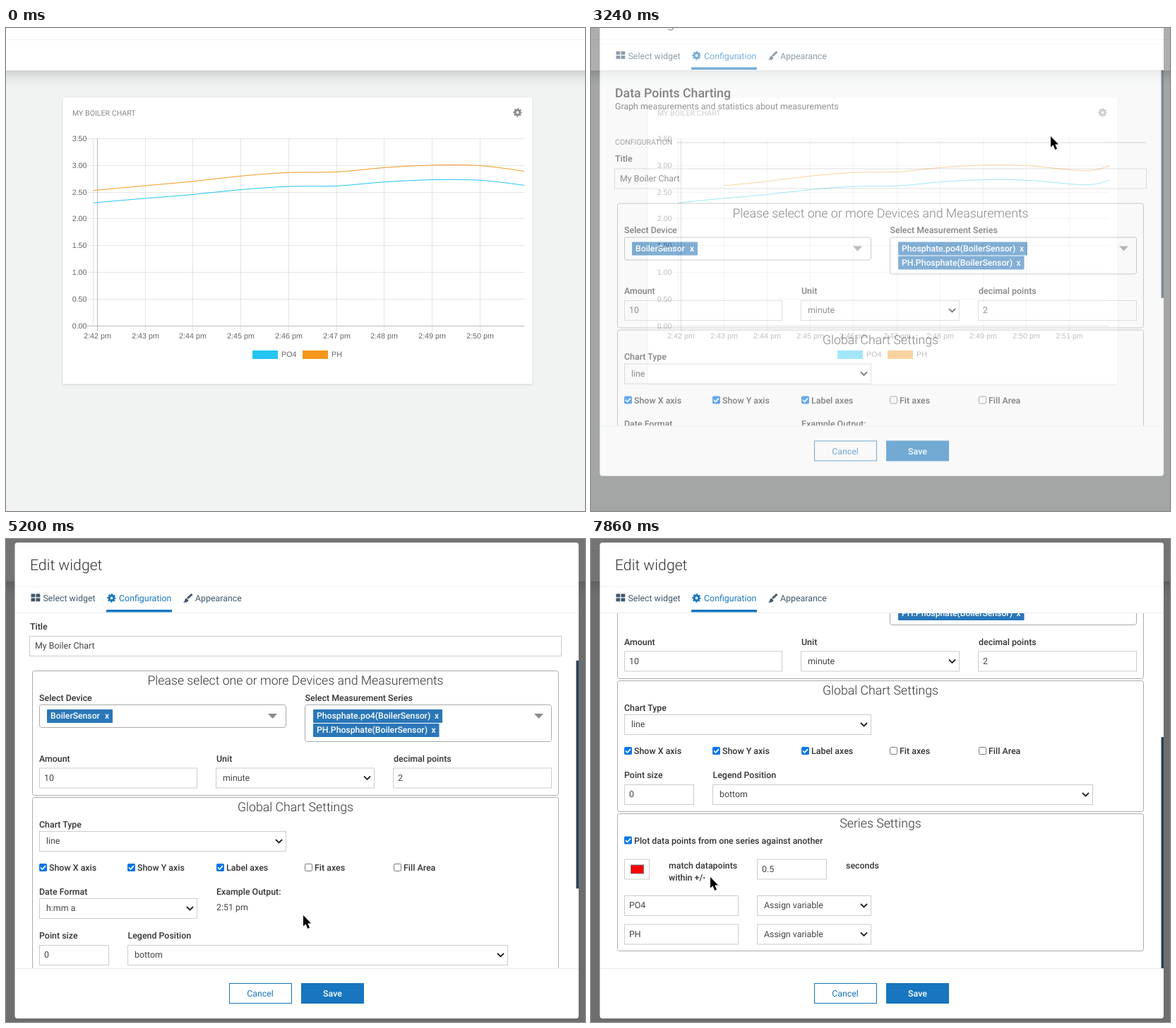
An HTML page that plays this animation: 820x683 px, repeating every 7990 ms.

```html
<!DOCTYPE html>
<html lang="en">
<head>
<meta charset="utf-8">
<title>Edit widget</title>
<style>
  html, body { margin: 0; width: 100%; height: 100%; overflow: hidden; background: #f1f3f3; }
  svg { display: block; width: 820px; height: 683px; }
  text { font-family: Roboto, sans-serif; text-rendering: geometricPrecision; white-space: pre; }
  .chart text { font-family: "Liberation Sans", Arial, sans-serif; }
  #menu > path:first-child { filter: drop-shadow(0 3px 7px rgba(0,0,0,.3)); }
  #card { filter: drop-shadow(0 1px 1px rgba(0,0,0,.16)); }
</style>
</head>
<body>
<svg id="stage" viewBox="0 0 820 683" xmlns="http://www.w3.org/2000/svg"></svg>
<script>
const BLUE = '#1776bf', SLATE = '#41586d', NAVY = '#1f4763', CYAN = '#22c5f3', ORANGE = '#f3981b';
const LOOP = 7990, TICKS = 65;
const VIEW = 503, MAX_SCROLL = 282;

// y is the middle of the capital letters
function text(x, y, str, { size = 12.4, weight = 400, fill = '#444', anchor = 'start' } = {}) {
  return `<text x="${x}" y="${y + size * .355 - .4}" font-size="${size}" font-weight="${weight}" fill="${fill}" text-anchor="${anchor}">${str}</text>`;
}
const label = (x, y, str) => text(x, y, str, { weight: 500, fill: '#333' });
const heading = (y, str) => text(410, y, str, { size: 17.7, weight: 300, fill: '#333', anchor: 'middle' });
const rect = (x, y, w, h, fill, more = '') => `<rect x="${x}" y="${y}" width="${w}" height="${h}" fill="${fill}" ${more}/>`;
const frame = (x1, y1, x2, y2, color = '#ccc', r = 0) =>
  rect(x1 + .5, y1 + .5, x2 - x1, y2 - y1, '#fff', `stroke="${color}" rx="${r}"`);
const panel = (x1, y1, x2, y2) => frame(x1, y1, x2, y2, '#aaa', 3);
const stroke = (d, color, width = 1) => `<path d="${d}" fill="none" stroke="${color}" stroke-width="${width}"/>`;
const line = (x1, y1, x2, y2, color) => stroke(`M${x1} ${y1}L${x2} ${y2}`, color);

const input = (x1, x2, y, str, pad = 7) => frame(x1, y - 14, x2, y + 14) + text(x1 + pad, y, str);
const select = (x1, x2, y, str) => input(x1, x2, y, str, 10) + stroke(`M${x2 - 14} ${y - 2}l4.5 4.5 4.5-4.5`, '#222', 1.8);

function checkbox(x, y, str, on) {
  const box = on
    ? rect(x, y - 6, 11, 11, '#0a77e8', 'rx="1.8"') + stroke(`M${x + 2} ${y - .5}l2.5 2.6 4.5-5`, '#fff', 1.7)
    : rect(x + .5, y - 5.5, 10, 10, '#fff', 'stroke="#767676" rx="1.8"');
  return box + label(x + 14, y, str);
}

const gear = (x, y, color) => `<g fill="none" stroke="${color}">
  <circle cx="${x}" cy="${y}" r="3.4" stroke-width="3"/>
  <circle cx="${x}" cy="${y}" r="5.1" stroke-width="2.4" stroke-dasharray="2" stroke-dashoffset="1"/></g>`;
const pencil = (x, y, color) => stroke(`M${x + 1.5} ${y + 9.5}l7-7m.6-.6l1-1`, color, 3.6) +
  `<path d="M${x} ${y + 11}v-4l4 4z" fill="${color}"/>`;
const bin = (x, y, color) => stroke(`M${x} ${y + 2}h9.5M${x + 3} ${y + .5}h3.500`, color, 1.4) +
  stroke(`M${x + 1.5} ${y + 3}v7.300h6.500v-7.300M${x + 3.700} ${y + 4}v6m2.100 0v-6`, color, 1.3);
const brush = (x, y, color) => stroke(`M${x + 6} ${y + 7}l6.500-6`, color, 3) +
  `<path d="M${x + 4} ${y + 6.500}l3.500 3q-1 4-7.500 3 2.500-1 2.200-3.500z" fill="${color}"/>`;

const chip = (x, y, w, str) => rect(x, y - 9.5, w, 19, '#2a77b8', 'rx="1"') +
  text(x + 5, y, str, { size: 12.2, weight: 500, fill: '#fff' }) +
  text(x + w - 8, y, 'x', { size: 12.2, weight: 500, fill: '#fff', anchor: 'middle' });
const triangle = (x, y) => `<path d="M${x - 6.5} ${y - 3.5}h13l-6.5 7z" fill="#8a8a8a"/>`;
const swatch = (y, color) => frame(47, y - 14, 82, y + 14) + rect(56.5, y - 5.5, 18, 12, color, 'stroke="#777"');

function smooth(points) {
  const at = i => points[Math.max(0, Math.min(points.length - 1, i))];
  const control = (p, from, to, k) => [0, 1].map(j => p[j] + (to[j] - from[j]) * k);
  return `M${points[0]}` + points.slice(1).map((p, i) =>
    `C${control(at(i), at(i - 1), p, 1 / 6)} ${control(p, at(i), at(i + 2), -1 / 6)} ${p}`).join('');
}

// PH per minute; PO4 runs at a fixed ratio below it
const PH = [2.53, 2.62, 2.7, 2.8, 2.865, 2.876, 2.957, 3.003, 2.994];

function chart(id, x0, step, ticks, tail, firstPh) {
  const grey = { size: 10.7, fill: '#666' };
  const shade = dark => `rgba(0,0,0,${dark ? .27 : .1})`;
  let out = line(123.5, 156, 123.5, 421, shade(false));
  for (let i = 0; i < 8; i++) {
    const y = Math.round(156 + i * 37.8) + .5;
    out += line(115, y, 734, y, shade(i === 7)) + text(114.5, y, (3.5 - i / 2).toFixed(2), { ...grey, anchor: 'end' });
  }
  for (let i = 0; i < ticks; i++) {
    const x = Math.round(x0 + i * step - .5) + .5;
    out += line(x, 156, x, 429, shade(i === 0)) + text(x, 436, `2:${42 + i} pm`, { ...grey, anchor: 'middle' });
  }
  const samples = PH.map((v, i) => [i, v]).concat(tail);
  const series = (ratio, from, color) => stroke(smooth(samples.slice(from)
    .map(([m, v]) => [m ? x0 + m * step : 124, 421 - v * ratio * 75.6])), color);
  out += series(1 / 1.1, 0, CYAN) + series(1, firstPh, ORANGE);
  [['PO4', CYAN], ['PH', ORANGE]].forEach(([str, color], i) =>
    out += rect(349 + i * 71, 456, 36, 12, color) + text(390 + i * 71, 462, str, grey));
  return `<g id="${id}" class="chart">${out}</g>`;
}

function page() {
  return rect(0, 0, 820, 683, '#f1f3f3') + rect(0, 60, 820, 24, 'url(#shade)') +
    rect(0, 0, 820, 60, '#fff') + line(0, 16.5, 820, 16.5, '#f0f1f1') +
    rect(80.5, 98.5, 665, 405, '#fff', 'rx="1.5" id="card"') +
    text(94, 120.5, 'MY BOILER CHART', { size: 10.6, fill: '#888' }) +
    chart('before', 129.5, 67.7, 9, [[8.93, 2.89]], 0) +
    chart('after', 127.5, 61.1, 10, [[9.37, 2.9], [9.93, 2.99]], 1) +
    `<g id="gearGrey">${gear(724.5, 119.5, '#8c8c8c')}</g>` +
    `<g id="handle">${stroke('M727 485l8.500 8M726.500 488v-3.500h3.500M736 489.500v3.500h-3.500', '#aaa')}</g>` +
    '<g id="menu"><path d="M707 103H742V208H601V138H707Z" fill="#fff"/>' + line(601, 173.5, 742, 173.5, '#eee') +
    pencil(615, 150, BLUE) + text(629, 156, 'Edit', { fill: BLUE }) +
    bin(615, 185, NAVY) + text(629, 191, 'Remove', { fill: NAVY }) + '</g>' +
    `<g id="gearBlue">${gear(724.5, 119.5, BLUE)}</g>`;
}

// Form body; "matched" is the layout with one series plotted against another.
function form(id, matched) {
  const up = matched ? -62 : 0;
  let out = text(34, 136.5, 'Data Points Charting', { size: 17.7, weight: 500, fill: '#333' }) +
    text(34, 155, 'Graph measurements and statistics about measurements') +
    text(34, 206.5, 'CONFIGURATION', { size: 10.6, fill: '#666' }) + line(122, 206.5, 786, 206.5, '#b8b8b8') +
    label(34, 229.5, 'Title') + input(33, 786, 257, 'My Boiler Chart', 8) +
    panel(37, 292, 782, 468) + heading(306.5, 'Please select one or more Devices and Measurements') +
    label(47, 330.5, 'Select Device') + panel(47, 340, 396, 372) +
    chip(58, 356.5, 93, 'BoilerSensor') + triangle(377.5, 356.5) +
    label(423.5, 330.5, 'Select Measurement Series') + panel(423, 340, 772, 392) +
    chip(435, 356.5, 183, 'Phosphate.po4(BoilerSensor)') + chip(435, 376.5, 178.5, 'PH.Phosphate(BoilerSensor)') +
    triangle(754.5, 356.5) +
    label(47, 416.5, 'Amount') + input(47, 270, 443.5, '10') +
    label(298, 416.5, 'Unit') + select(297, 521, 443.5, 'minute') +
    label(549, 416.5, 'decimal points') + input(548, 772, 443.5, '2') +
    panel(37, 471, 782, 718 + up) + heading(485.5, 'Global Chart Settings') +
    label(47, 509.5, 'Chart Type') + select(47, 396, 533, 'line');
  ['Show X axis', 'Show Y axis', 'Label axes', 'Fit axes', 'Fill Area']
    .forEach((str, i) => out += checkbox(Math.floor(47 + i * 125.5), 571, str, i < 3));
  if (!matched) out += label(47, 604.5, 'Date Format') + select(47, 270, 628, 'h:mm a') +
    label(298, 604.5, 'Example Output:') + text(298, 626.5, '2:51 pm');
  out += `<g transform="translate(0 ${up})">` +
    label(47, 666.5, 'Point size') + input(47, 145, 694, '0') +
    label(172.5, 666.5, 'Legend Position') + select(172, 710, 694, 'bottom') +
    panel(37, 721, 782, matched ? 915 : 864) + heading(735.5, 'Series Settings') +
    checkbox(47, 759.5, 'Plot data points from one series against another', matched);
  if (matched) out += swatch(799.5, '#f00') + label(110, 794.5, 'match datapoints') + label(110, 811.5, 'within +/-') +
    input(235, 333, 799.5, '0.5') + label(361, 794.5, 'seconds');
  [['PO4', CYAN], ['PH', ORANGE]].forEach(([str, color], i) => {
    const y = (matched ? 851 : 799.5) + i * 40.5;
    out += matched
      ? input(47, 208, y, str) + select(235, 396, y, 'Assign variable')
      : swatch(y, color) + input(109, 270, y, str) + rect(298, y - 14, 42.5, 28, BLUE) +
        stroke(`M316 ${y - 4}l3.300 3 3.300-3m-6.600 4l3.300 3 3.300-3`, '#fff', 1.4);
  });
  return `<g id="${id}">${out}</g></g>`;
}

function modal() {
  let tiles = '';
  for (let i = 0; i < 4; i++) tiles += rect(35.5 + i % 2 * 7, 77.5 + (i >> 1) * 6, 5.8, 4.8, SLATE);
  return '<g id="overlay">' + rect(0, 0, 820, 683, '#000', 'opacity=".545"') + '<g id="modal">' +
    rect(12.5, 5, 798.5, 673, '#fff', 'rx="4"') +
    text(34, 36.5, 'Edit widget', { size: 21.2, weight: 300, fill: '#333' }) +
    line(13, 67.5, 811, 67.5, '#f0f1f2') + line(13, 104.5, 811, 104.5, '#eceef0') +
    tiles + text(52.5, 84, 'Select widget', { fill: SLATE }) +
    gear(149.5, 83.5, BLUE) + text(160, 84, 'Configuration', { fill: BLUE }) + rect(142, 100, 93, 3.5, BLUE) +
    brush(251, 77, SLATE) + text(268, 84, 'Appearance', { fill: SLATE }) +
    `<g clip-path="url(#view)"><g id="scroller">${form('plain', false)}${form('matched', true)}</g></g>` +
    rect(807.5, 104, 3.5, 323, '#2b4052', 'id="thumb"') +
    line(13, 607.5, 811, 607.5, '#eceef0') +
    rect(316.5, 628.5, 88, 28, '#fff', `stroke="${BLUE}"`) + text(360, 643, 'Cancel', { fill: BLUE, anchor: 'middle' }) +
    rect(418, 628, 89, 29, BLUE) + text(462.5, 643, 'Save', { weight: 500, fill: '#fff', anchor: 'middle' }) +
    '</g></g>';
}

const CURSORS = {
  arrow: 'M0 0V15.500L3.500 12.400 6.300 19 9 17.800 6.300 11.400H11Z',
  hand: 'M-1 1Q1-1 3 1V6L9 7.500Q11.500 8 11 12L9 16V20H0V17L-4 12Q-5 9-3 9.500L-1 11Z',
  beam: 'M-5.500-9H5.500V-6H2V6.500H5.500V9.500H-5.500V6.500H-2V-6H-5.500Z'
};

const stage = document.getElementById('stage');
stage.innerHTML = `<defs>
  <linearGradient id="shade" x2="0" y2="1"><stop stop-opacity=".14"/><stop offset=".5" stop-opacity=".04"/><stop offset="1" stop-opacity="0"/></linearGradient>
  <clipPath id="view"><rect x="13" y="105" width="798" height="502"/></clipPath></defs>` +
  page() + modal() + '<path id="cursor"/>';
const $ = id => document.getElementById(id);

// Stops on the pointer's way: tick, x, y
const WAY = [
  [4, 802, 674], [7, 519, 590], [9, 501, 473], [12, 804, 150], [13, 744, 119], [18, 716, 118],
  [20, 688, 142], [23, 651, 153], [33, 651, 153], [34, 482, 207], [38, 156, 530], [42, 421, 532],
  [47, 346, 534], [52, 123, 519], [54, 81, 487], [58, 52, 476], [61, 52, 476], [64, 169, 478]
];

function pointerAt(tick) {
  const next = WAY.findIndex(stop => stop[0] > tick);
  if (next < 0) return WAY.at(-1).slice(1);
  const [from, to] = [WAY[next - 1], WAY[next]];
  const p = (tick - from[0]) / (to[0] - from[0]);
  return [1, 2].map(i => from[i] + (to[i] - from[i]) * p);
}

const between = (v, a, b) => v >= a && v < b;
const progress = (tick, from, to) => Math.max(0, Math.min(1, (tick - from) / (to - from)));
const easeOut = (p, power) => 1 - (1 - p) ** power;
const show = (id, on) => $(id).style.display = on ? '' : 'none';
const move = (id, x, y) => $(id).setAttribute('transform', `translate(${x} ${y})`);

function draw(tick) {
  show('cursor', tick >= WAY[0][0]);
  if (tick >= WAY[0][0]) {
    const shape = between(tick, 15, 23) ? 'hand' : between(tick, 49, 53) ? 'beam' : 'arrow';
    $('cursor').setAttribute('d', CURSORS[shape]);
    move('cursor', ...pointerAt(tick));
  }
  const gearHot = between(tick, 15, 23);
  show('gearBlue', gearHot);
  show('gearGrey', !gearHot);
  show('menu', between(tick, 18, 23));
  show('handle', between(tick, 14, 23));
  show('before', tick < 24);
  show('after', tick >= 24);

  const opening = progress(tick, 24, 28);
  show('overlay', opening > 0);
  $('overlay').setAttribute('opacity', easeOut(opening, 1.25));
  move('modal', 0, -178 * (1 - opening) ** 2);

  const matched = tick >= 61;
  const scroll = matched ? MAX_SCROLL - 11 : Math.round(MAX_SCROLL * easeOut(progress(tick, 41, 46), 2.11));
  const ratio = VIEW / (matched ? 774 : 785);
  show('plain', !matched);
  show('matched', matched);
  move('scroller', 0, -scroll);
  $('thumb').setAttribute('y', 104 + scroll * ratio);
  $('thumb').setAttribute('height', VIEW * ratio);
}

const start = performance.now();
function play() {
  const t = (performance.now() - start) % LOOP;
  draw(Math.floor(t / LOOP * TICKS + .1));
  requestAnimationFrame(play);
}
play();
</script>
</body>
</html>
```
